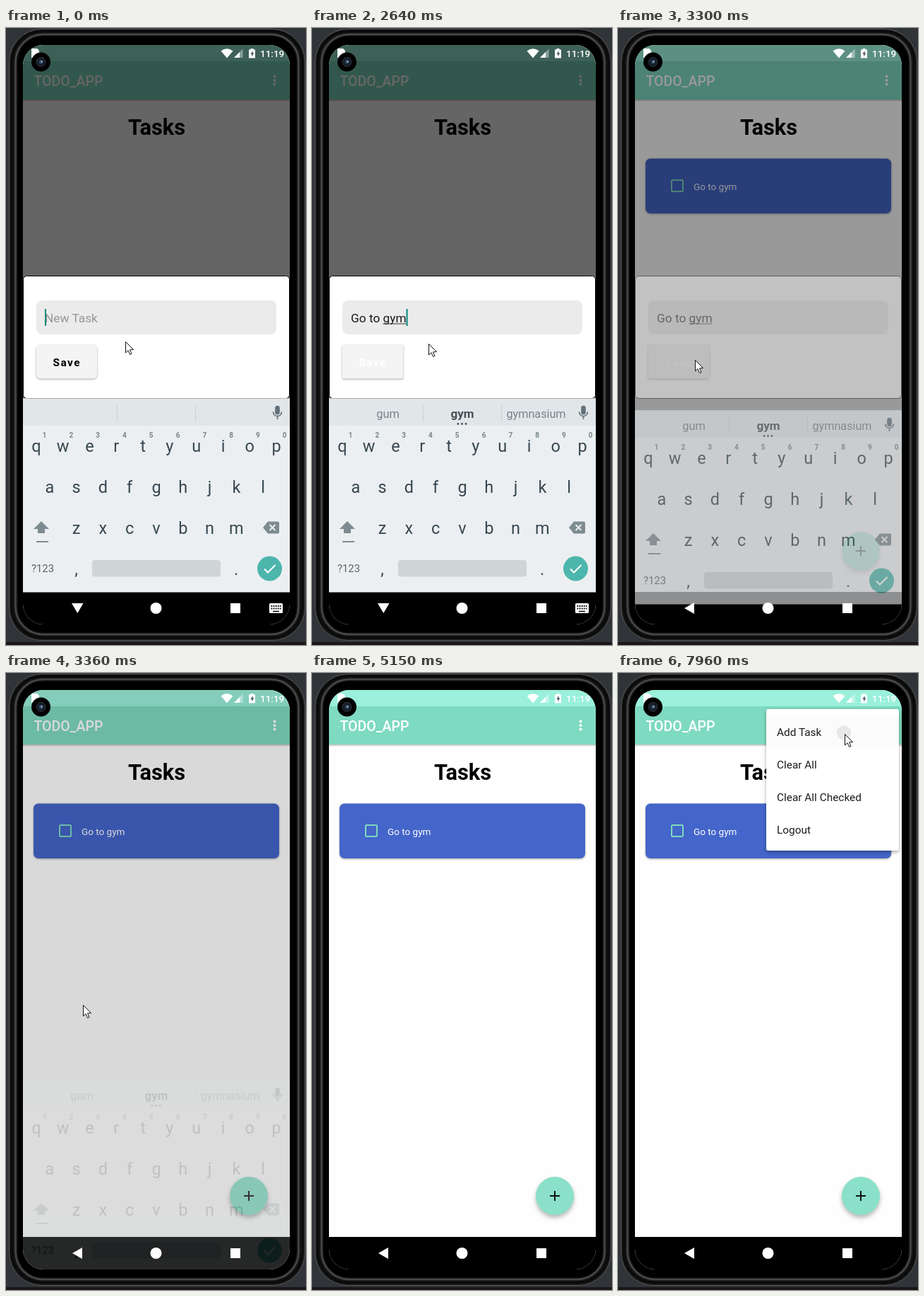
These frames come from a looping animation (425 by 872 pixels, 8000 ms). An HTML page:

```html
<!DOCTYPE html>
<html lang="en">
<head>
<meta charset="utf-8">
<title>Todo app</title>
<style>
  html, body { margin: 0; width: 100%; height: 100%; overflow: hidden; background: #303337; }
  svg { display: block; width: 425px; height: 872px; }
  text { font-family: Roboto, sans-serif; white-space: pre; }
  .mid { text-anchor: middle; }
  .soft { filter: drop-shadow(0 1.5px 1.5px rgba(0,0,0,.35)); }
  .lift { filter: drop-shadow(0 4px 3px rgba(0,0,0,.28)); }
  .pop { filter: drop-shadow(0 2px 2.5px rgba(0,0,0,.35)); }
</style>
</head>
<body>
<svg viewBox="0 0 425 872" xmlns="http://www.w3.org/2000/svg">
  <defs>
    <clipPath id="screen"><rect x="24" y="24" width="378" height="819" rx="29"/></clipPath>
    <clipPath id="reveal"><rect id="revealBox" y="51"/></clipPath>
  </defs>

  <!-- device body -->
  <rect width="425" height="872" fill="#303337"/>
  <rect y="868" width="425" height="4" fill="#1c1519"/>
  <rect x="4.5" y="1.5" width="419" height="864" rx="46" fill="#161616" stroke="#5a5a5a"/>
  <rect x="8.5" y="4.5" width="411" height="857" rx="43" fill="none" stroke="#0a0a0a" stroke-width="3"/>
  <rect x="13.5" y="9" width="401" height="848" rx="39" fill="none" stroke="#484848" stroke-width="2.5"/>
  <rect x="16.5" y="11.5" width="395" height="843" rx="36" fill="#000"/>

  <g clip-path="url(#screen)">
    <!-- app -->
    <rect x="24" y="24" width="378" height="819" fill="#fefefe"/>
    <rect class="soft" x="20" y="47" width="386" height="54" fill="#7edac0"/>
    <rect x="24" y="24" width="378" height="23" fill="#9af0da"/>
    <text x="39.5" y="82" font-size="19.5" font-weight="500" fill="#fff">TODO_APP</text>
    <g fill="#fff"><circle cx="380.5" cy="68.5" r="2"/><circle cx="380.5" cy="74" r="2"/><circle cx="380.5" cy="79.5" r="2"/></g>
    <text class="mid" x="213.5" y="151" font-size="30.8" font-weight="700">Tasks</text>
    <g id="card">
      <rect class="soft" x="39" y="184.5" width="348" height="77.5" rx="7" fill="#4465c9"/>
      <rect x="76" y="215" width="16" height="16" rx="1.5" fill="none" stroke="#7edac0" stroke-width="2"/>
      <text x="107" y="228.5" font-size="13.5" fill="#fff">Go to gym</text>
    </g>
    <circle class="lift" cx="344" cy="739" r="27" fill="#8ae0c8"/>
    <path d="M337 739h14M344 732v14" stroke="#111" stroke-width="2"/>
    <rect id="scrim" x="24" y="24" width="378" height="773"/>
    <rect x="24" y="797" width="378" height="46"/>

    <!-- new task sheet -->
    <g id="sheet">
      <rect x="24.5" y="350.5" width="377" height="173" rx="5" fill="#fff" stroke="#000"/>
      <rect x="43" y="385" width="340" height="48" rx="8" fill="#ebebeb"/>
      <text id="field" x="55" y="416" font-size="17.3"></text>
      <rect id="under" y="417.5" height="1" fill="#333"/>
      <rect id="caret" y="397" width="2" height="24" fill="#00897b"/>
      <rect id="btn" class="soft" x="43" y="448" width="86" height="47.5" fill="#f4f4f4"/>
      <text id="save" x="66.5" y="478" font-size="15.4" font-weight="700" letter-spacing="1.5">Save</text>
    </g>

    <!-- keyboard -->
    <g id="keys">
      <rect x="24" y="523.5" width="378" height="274" fill="#eceff1"/>
      <rect x="24" y="523.5" width="378" height="38.5" fill="#e1e6e9"/>
      <path d="M157.5 532v24M268.5 532v24" stroke="#cbd2d6"/>
      <g id="hints" class="mid" fill="#78838a">
        <text x="107.5" y="551" font-size="16.4"></text>
        <text x="213" y="551" font-size="17" font-weight="700" fill="#455055"></text>
        <text x="317.5" y="551" font-size="16.2"></text>
        <g fill="#455055"><circle cx="207" cy="559.5" r="1.4"/><circle cx="212.5" cy="559.5" r="1.4"/><circle cx="218" cy="559.5" r="1.4"/></g>
      </g>
      <g fill="none" stroke="#62717a" stroke-width="1.7">
        <rect x="382" y="534.5" width="5" height="11" rx="2.5" fill="#62717a"/>
        <path d="M378.5 542.5a6 6 0 0 0 12 0M384.5 549v4"/>
      </g>
      <g id="letters" class="mid" fill="#37474f"></g>
      <path d="M50 697l11 11h-6v6h-10v-6h-6z" fill="#7d8b90"/>
      <rect x="43" y="725" width="17" height="2" fill="#7d8b90"/>
      <path d="M371 697.5h14q2 0 2 2v13q0 2-2 2h-14l-7-8.500z" fill="#7d8b90"/>
      <path d="M373.500 702l8 8m0-8l-8 8" stroke="#eceff1" stroke-width="2"/>
      <rect x="122" y="752" width="182" height="23.500" rx="4" fill="#cfd5d7"/>
      <circle cx="373.500" cy="764" r="17.500" fill="#4db6ac"/>
      <path d="M366 764.500l5 5 10.500-10.500" fill="none" stroke="#fff" stroke-width="2"/>
    </g>

    <!-- system bars -->
    <g fill="#fff">
      <path d="M36 29h8l3 3v10H36z"/>
      <path d="M304.500 32.500Q313 26 321.500 32.500L313 42.500z"/>
      <path d="M335.500 29.500V42h-12.500z" opacity=".4"/>
      <path d="M331 34V42h-8z"/>
      <path d="M346.500 29h4v1.500h2.500V42.500h-9V30.500h2.500z"/>
      <path d="M349.500 32l-3 5h1.800v3.500l3-5h-1.800z" fill="#456"/>
      <text x="360" y="41" font-size="13.500" font-weight="500">11:19</text>
      <path id="down" d="M93 813h16.500l-8.200 14z"/>
      <path id="back" d="M108 812v16l-14-8z"/>
      <circle cx="212.500" cy="820" r="8"/>
      <rect x="318" y="813" width="14" height="14"/>
      <g id="kbd">
        <rect x="373" y="813" width="19" height="14" rx="1.500"/>
        <path d="M375.500 817h14M375.500 820.500h14" stroke="#000" stroke-width="1.800" stroke-dasharray="1.800 1.300"/>
        <path d="M378 824.500h9" stroke="#000" stroke-width="1.500"/>
      </g>
    </g>

    <!-- overflow menu -->
    <g id="menu" class="pop">
      <g clip-path="url(#reveal)">
        <rect id="menuBg" x="200" y="51" width="202" height="205"/>
        <rect id="row" x="210" y="60" width="188" height="45.500" fill="#fbfbfb"/>
        <circle id="ripple" cx="320" cy="84.500" r="10.300" fill="#e7e7e7"/>
        <g id="items" font-size="15.400" fill="#1c1c1c"></g>
      </g>
    </g>
  </g>

  <!-- camera -->
  <circle cx="49.500" cy="48" r="13.500"/>
  <circle cx="49.500" cy="48" r="6.500" fill="#151d28" stroke="#30343a"/>
  <circle cx="49.500" cy="48" r="3" fill="#2c415c"/>
  <circle cx="50.500" cy="47.500" r="1.200" fill="#a9bdd0"/>

  <path id="mouse" d="M.5 .5V16L4 12.700 6.600 18.500 9 17.400 6.500 11.900 11.500 11.600z" fill="#fff" stroke="#111" stroke-linejoin="round"/>
</svg>
<script>
const LOOP = 8000;
const $ = id => document.getElementById(id);
const set = (el, attrs) => { for (const k in attrs) el.setAttribute(k, attrs[k]); };
const show = (el, on) => set(el, { visibility: on ? 'visible' : 'hidden' });

function label(parent, str, x, y, attrs = {}) {
  const el = document.createElementNS('http://www.w3.org/2000/svg', 'text');
  set(el, { x, y, ...attrs });
  el.textContent = str;
  parent.append(el);
}

// keyboard letters and menu items
const KEY = 37.8;
[['qwertyuiop', 42.9, 599], ['asdfghjkl', 61.8, 657], ['zxcvbnm', 99.6, 715]].forEach(([row, x0, y]) =>
  [...row].forEach((c, i) => label($('letters'), c, x0 + i * KEY, y, { 'font-size': 23.5 })));
for (let i = 0; i < 10; i++)
  label($('letters'), (i + 1) % 10, 54.5 + i * KEY, 579, { 'font-size': 10, 'font-weight': 700, fill: '#78858c' });
label($('letters'), '?123', 52, 769, { 'font-size': 14.8, fill: '#55646b' });
label($('letters'), ',', 99.6, 773, { 'font-size': 23.5 });
label($('letters'), '.', 326, 773, { 'font-size': 23.5 });
['Add Task', 'Clear All', 'Clear All Checked', 'Logout'].forEach((s, i) =>
  label($('items'), s, 225, 88.5 + i * 46.2));

const pen = document.createElement('canvas').getContext('2d');
pen.font = '17.3px Roboto, sans-serif';
const widthOf = s => pen.measureText(s).width;

// progress 0..1 held in n jumps; the first falls on a, the last on b
function jumps(t, a, b, n) {
  if (t < a) return 0;
  return Math.min(n, Math.floor((t - a) / (b - a) * (n - 1) + 1e-6) + 1) / n;
}
const ease = p => p * p * (3 - 2 * p);
const lastOf = (list, t) => list.filter(e => e[0] <= t).pop();

const TYPED = [[0, ''], [870, 'G'], [1060, 'Go'], [1260, 'Go '], [1460, 'Go t'], [1590, 'Go to'],
  [1660, 'Go to '], [1900, 'Go to g'], [2000, 'Go to gy'], [2090, 'Go to gym']];
const HINTS = [[0, []], [1130, ['God', 'Go', 'Good']], [1260, []], [2270, ['gum', 'gym', 'gymnasium']]];
// time, scrim, sheet, keyboard opacity, keyboard drop
const CLOSE = [[0, .6, 1, 1, 0], [3300, .4, .4, .6, 17], [3360, .145, 0, .16, 52], [3420, 0, 0, 0, 70]];
// start, end, jumps, from, control, to
const MOVES = [
  [0, 1, 1, [169, 443], [169, 443], [169, 443]],
  [2640, 2940, 6, [169, 443], [142, 462], [109, 469]],
  [3620, 3621, 1, [109, 469], [109, 469], [110, 469]],
  [3870, 4180, 6, [110, 469], [148, 408], [169, 418]],
  [4490, 5150, 12, [169, 418], [330, 520], [402, 880]],
  [6380, 6820, 8, [408, 850], [331, 65], [380, 91]],
  [7540, 7720, 4, [380, 91], [352, 88], [321, 86]]
];

function drawSheet(t) {
  const str = lastOf(TYPED, t)[1];
  const word = str.slice(str.lastIndexOf(' ') + 1);
  const w = widthOf(str), ww = widthOf(word);
  $('field').textContent = str || 'New Task';
  set($('field'), { fill: str ? '#1b1b1b' : '#969696' });
  set($('under'), { x: 55 + w - ww, width: ww });
  set($('caret'), { x: 55 + w });
  $('caret').style.display = t < 440 || (t >= 870 && t < 2760) ? '' : 'none';

  const off = jumps(t, 870, 990, 3);
  set($('save'), { fill: off === 1 ? '#fff' : `rgb(${[1, 1, 1].map(() => Math.round(255 * off))})` });
  set($('btn'), { rx: off ? 1 : 6 });

  const words = lastOf(HINTS, t)[1];
  [...$('hints').querySelectorAll('text')].forEach((el, i) => el.textContent = words[i] || '');
  $('hints').style.display = words.length ? '' : 'none';

  const [, scrim, sheet, keys, drop] = lastOf(CLOSE, t);
  set($('scrim'), { opacity: scrim });
  set($('sheet'), { opacity: sheet });
  set($('keys'), { opacity: keys, transform: `translate(0 ${drop})` });

  const saved = t >= 3240;
  show($('card'), saved);
  show($('back'), saved);
  show($('down'), !saved);
  show($('kbd'), !saved);
}

function drawMenu(t) {
  const p = jumps(t, 7000, 7300, 6), q = 1 - p;
  const left = 210 + 120 * q, bottom = 251 - 220 * q;
  set($('menu'), { opacity: Math.min(1, p * 1.45) });
  set($('revealBox'), { x: left, width: Math.min(402, 398 + 64 * q) - left, height: Math.max(0, bottom - 51), rx: q ? 0 : 3 });
  set($('menuBg'), { fill: q ? '#f4f4f4' : '#fff' });
  set($('items'), { transform: `translate(${64 * q} ${-110 * q})` });
  show($('row'), t >= 7960);
  show($('ripple'), t >= 7960);
}

function drawMouse(t) {
  const [a, b, n, from, ctrl, to] = lastOf(MOVES, t);
  const p = ease(jumps(t, a, b, n)), q = 1 - p;
  const [x, y] = [0, 1].map(i => Math.round(q * q * from[i] + 2 * p * q * ctrl[i] + p * p * to[i]));
  set($('mouse'), { transform: `translate(${x} ${y})` });
  show($('mouse'), t < 5150 || t >= 6380);
}

function draw(t) {
  drawSheet(t);
  drawMenu(t);
  drawMouse(t);
}

let start;
function tick(now) {
  start ??= now;
  draw((now - start) % LOOP);
  requestAnimationFrame(tick);
}
draw(0);
requestAnimationFrame(tick);
</script>
</body>
</html>
```
